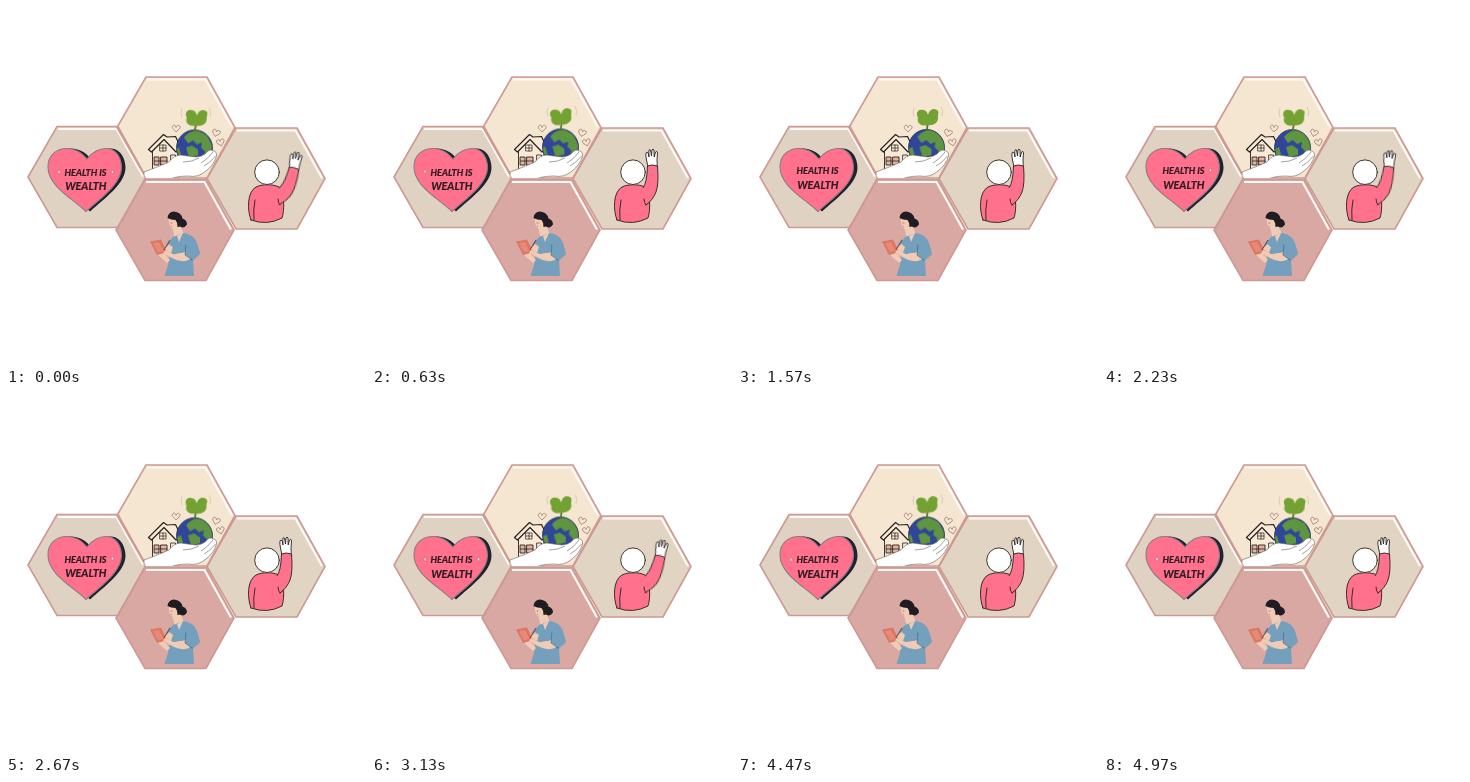
Recreate the animation shown at these times as an HTML page. Size 360 by 360 pixels, loop 5 s.

```html
<!DOCTYPE html>
<html lang="en">
<head>
<meta charset="utf-8">
<title>Health is wealth</title>
<style>
  html, body { margin: 0; width: 100%; height: 100%; overflow: hidden; background: #fff; }
  svg { display: block; width: 100vw; height: 100vh; }
  text { font-family: Lato, "Open Sans", sans-serif; font-style: italic; font-weight: 700; fill: #2c1a20; stroke: #2c1a20; stroke-width: .2; text-anchor: middle; }
  .ink { stroke: #27221f; stroke-width: .9; stroke-linejoin: round; stroke-linecap: round; }
  .line { fill: none; }
  .pink { fill: #ff718c; }
  .white { fill: #fff; }
  .skin { fill: #f0cbb5; }
  .scrubs { fill: #75a0bd; }

  .words { animation: bob 5s infinite; }
  .left { animation: left 5s infinite step-end; }
  .right { animation: right 5s infinite step-end; }
  .arm { transform-origin: 274px 192px; animation: wave 1s infinite step-end; }
  .leaf { transform-origin: 189px 123px; animation: sway 1.25s infinite ease-in-out; }
  .world { animation: lift 1.25s infinite ease-in-out; }
  .land { animation: drift 2.5s infinite alternate ease-in-out; }
  .writer { transform-origin: 176px 246px; animation: write 1s infinite ease-in-out; }

  /* a four second cycle, cut off after five seconds */
  @keyframes bob {
    0%, 80% { transform: translateY(.9px); animation-timing-function: ease-in-out; }
    40% { transform: translateY(-.9px); animation-timing-function: ease-in-out; }
    80% { animation-timing-function: ease-in; }
    100% { transform: translateY(0); }
  }
  @keyframes left { 0%, 54% { opacity: 1; } 24% { opacity: 0; } }
  @keyframes right { 0%, 38% { opacity: 1; } 7%, 87% { opacity: 0; } }
  @keyframes wave {
    0% { transform: rotate(14deg); }
    20% { transform: rotate(8deg); }
    36%, 100% { transform: none; }
  }
  @keyframes sway { 0%, 100% { transform: rotate(4deg); } 50% { transform: rotate(-3deg); } }
  @keyframes lift { 0%, 100% { transform: translateY(.5px); } 50% { transform: translateY(-.5px); } }
  @keyframes drift { from { transform: translateX(-1px); } to { transform: translateX(1px); } }
  @keyframes write { 0%, 100% { transform: rotate(-1deg); } 50% { transform: rotate(1deg); } }
</style>
</head>
<body>
<svg viewBox="0 0 360 360">
  <defs>
    <path id="hex" d="M-59 0L-30 -50.5H31L59 0L31 50.5H-30Z"/>
    <g id="frame">
      <path d="M-29 -48H29.5L56 -.5" fill="none" stroke="#fffaf6" stroke-width="2.2"/>
      <use href="#hex" fill="none" stroke="#cd9992" stroke-width="1.6"/>
    </g>
    <path id="heart" d="M80 205.500C66 192 42 180 42 161C42 148 52 142 62 142.500C71 143 77 148 81 153C86 146 94 142 101 142.500C111 143 115.500 153 115.500 162C115 178 95 192 80 205.500Z"/>
    <path id="love" d="M0 3.500C-2 1 -4.500 0 -3.500 -2.300C-2 -4.500 0 -3 0 -1C1 -4.500 4.500 -3 4 -1C3.500 1 1 2 0 3.500Z" fill="none" stroke="#ab857d" stroke-width=".9"/>
    <path id="spark" d="M0 -2.2L.7 -.7L2.2 0L.7 .7L0 2.2L-.7 .7L-2.2 0L-.7 -.7Z" fill="#ffe3e3" stroke="#7c5260" stroke-width=".35"/>
    <clipPath id="topClip"><use href="#hex" x="170" y="121.500"/></clipPath>
    <clipPath id="globeClip"><circle cx="188.500" cy="141.500" r="17.500"/></clipPath>
  </defs>

  <use href="#hex" x="81" y="171" fill="#e0d2c2"/>
  <use href="#hex" x="170" y="121.500" fill="#f5e6d1"/>
  <use href="#hex" x="260" y="172.500" fill="#e2d4c3"/>
  <use href="#hex" x="169" y="224" fill="#d9a8a3"/>
  <use href="#frame" x="81" y="171"/>
  <use href="#frame" x="260" y="172.500"/>
  <use href="#frame" x="170" y="121.500"/>
  <use href="#frame" x="169" y="224"/>

  <!-- heart -->
  <use href="#heart" x="4" fill="#20222f"/>
  <use href="#heart" fill="#ff718c" stroke="#8d7a82" stroke-width="1.1"/>
  <g class="words">
    <text x="79.500" y="169" font-size="9.200">HEALTH IS</text>
    <text x="79.800" y="183.500" font-size="10.800">WEALTH</text>
    <g class="left"><use href="#spark" x="53" y="165"/></g>
    <g class="right"><use href="#spark" x="106.500" y="165"/></g>
  </g>

  <!-- house, globe and hand -->
  <g clip-path="url(#topClip)">
    <g class="ink" fill="#f8ead6">
      <path d="M146.500 143V165H172V141L158 130Z"/>
      <path d="M142.500 143.500L157.500 128.500L161 131L169.500 130.500L176 144L170 146L158 133.500L145.500 146Z" stroke-width="1.200"/>
      <path d="M154 139H160V145H154ZM157 139V145M154 142H160" stroke-width=".7"/>
      <path d="M148.500 151H153V159H148.500ZM155 151H161V159H155Z" fill="#e6b3a2"/>
      <path d="M148.500 155H161M165 149H169.500V162H165Z" stroke-width=".8"/>
    </g>
    <g class="world">
      <circle cx="188.500" cy="141.500" r="18" fill="#2f469a" stroke="#26334f" stroke-width=".8"/>
      <g clip-path="url(#globeClip)">
        <g class="land" fill="#5f9440">
          <path d="M179 131Q184 124 193 124L202 129L207 139L206 149L199 151L200 145L196 141L197 136L192 138L188 134L183 137Z"/>
          <path d="M181 141L187 139L193 143L193 149L184 151Z"/>
          <path d="M170 143L174 141L176 148L172 152Z"/>
        </g>
      </g>
      <g class="leaf">
        <path d="M188.500 125Q190 120 189.500 114" fill="none" stroke="#55722d" stroke-width="1.800"/>
        <path d="M189.500 119C184 121 178 117 180 112C177 107 180 103 185 104C188 104 189.500 107 190 109C191 104 195 101.500 199 104C202 106 199 109 200 112C200 117 195 120 189.500 119Z" fill="#74a232"/>
      </g>
      <path d="M176 111Q174 106 176 102M204 110Q206 105 203 101" fill="none" stroke="#c3bda4" stroke-width=".6"/>
    </g>
    <use href="#love" x="170" y="122.500"/>
    <use href="#love" x="210" y="127" transform="rotate(15 210 127)"/>
    <use href="#love" x="214.500" y="136.500" transform="rotate(-15 214.500 136.500)"/>
    <path class="white" stroke="#6b625d" stroke-width=".6" d="M138 166Q152 161 163 156Q168 149 175 149Q181 150 190 151Q195 151 199 148Q204 142 207 145Q211 145 210.500 150Q208 159 200 165Q192 172 182 170Q168 170 160 175H138Z"/>
    <path fill="none" stroke="#6b625d" stroke-width=".6" d="M193 152Q186 156 177 156M207 146Q202 153 195 157M209.500 150Q204 157 198 160"/>
  </g>

  <!-- waving figure -->
  <path class="ink pink" d="M245 214C241 204 241 186 250 181C256 178 267 178 273 181C278 187 279 203 276 212Q261 220 245 214Z"/>
  <g class="arm">
    <path class="ink white" d="M276 161L274.500 154Q273 146 275 146Q276.500 146 277 151L276.800 145Q277 143 278.500 144L279.500 150L280 144Q281 142 282 144L282.200 151L283.500 146Q285 144 285.500 147L285 154Q285.500 158 285 161Z"/>
    <path class="ink pink" d="M271 182Q275 177 275.500 160Q280 158 285.500 160Q287 178 284 186Q281 194 274 199"/>
  </g>
  <path class="pink" d="M264 181L272 182L274 198L265 202Z"/>
  <path class="ink line" d="M249 194Q247 204 248 214M274 199Q272 197 272 193"/>
  <circle class="ink white" cx="261" cy="166.200" r="12.300"/>

  <!-- nurse -->
  <path class="skin" d="M166 221L174 218L178 229L169 233Z"/>
  <path class="scrubs" d="M167 231L178 227Q188 229 190.500 236L194 248L187 254L188 270H158.500L162 259L164 246Q160 242 161 238Z"/>
  <path class="skin" d="M171 230L177 227L173 236Z"/>
  <path d="M180 238Q179 251 186 254M165 247Q172 250 177 246" fill="none" stroke="#456f89" stroke-width=".8"/>
  <path class="skin" d="M163 211Q169 208 173 213L172 220Q168 224 165 221.500Q162 217 163 211Z"/>
  <path d="M161.500 212Q162 206 168 205.500Q175 206 176.500 212.500Q181 214 181 218.500Q178 223 174 220.500L171.500 221Q172 217 169.500 214Q165 214 161.500 212Z" fill="#201c22"/>
  <path d="M164.500 217H166.500M165 220.300H166" stroke="#8e5148" stroke-width=".6"/>
  <path d="M144 235.500L155 233.500L161.500 247L151 249Z" fill="#dd7763"/>
  <path d="M147 237L153 236L157.500 245L152 246.500Z" fill="#e48a76"/>
  <g class="writer">
    <path class="skin" d="M187 251Q178 259 166 252L157 247L159 244L168 248L180 246Z"/>
    <path d="M158 244L164 234" stroke="#4e3738" stroke-width="1" fill="none"/>
    <path class="skin" d="M159 243L163 238L167 241L165 247Z"/>
    <path class="scrubs" d="M180 237L190.500 236L194 248L187 254.500L179 249Z"/>
    <path d="M180 239L179 249L187 254.500" fill="none" stroke="#456f89" stroke-width=".7"/>
  </g>
  <path class="skin" d="M152 249L158 247L164 254L161 257Z"/>
</svg>
</body>
</html>
```
